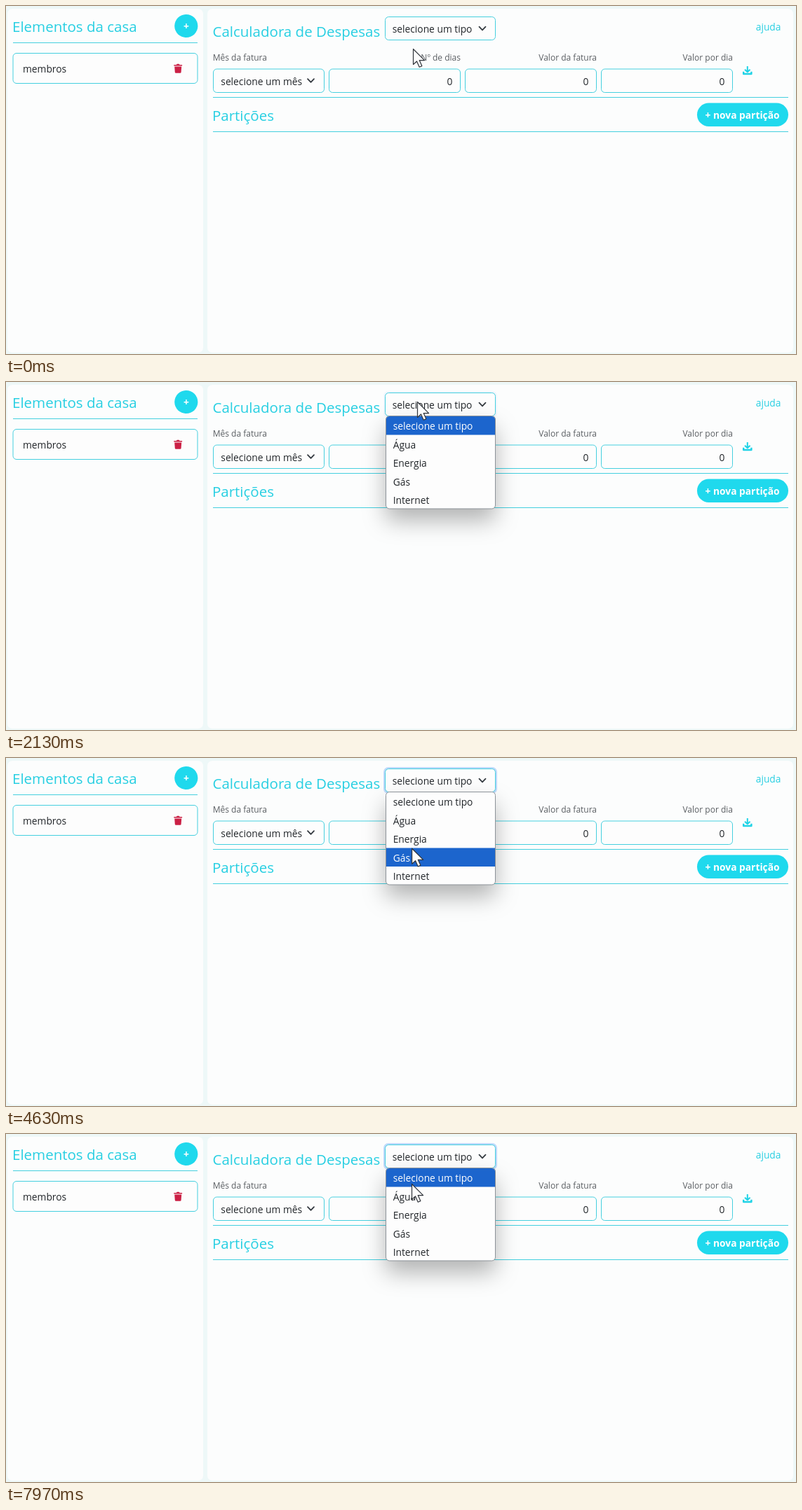
These frames come from a looping animation (1126 by 497 pixels, 8000 ms). An HTML page:

```html
<!DOCTYPE html>
<html lang="pt">
<head>
<meta charset="utf-8">
<title>Calculadora de Despesas</title>
<style>
html, body { margin: 0; width: 100%; height: 100%; overflow: hidden; background: #eef8f8; }
svg { display: block; width: 1126px; height: 497px; }
text { font: 13.8px "Open Sans", "Noto Sans", sans-serif; fill: #212529; }
.title { font-size: 20.5px; fill: #27cfe2; }
.label { font-size: 12px; fill: #5a5e62; }
.link { fill: #27cfe2; }
.end { text-anchor: end; }
.bold { font-weight: 700; fill: #fff; }
.panel { fill: #fcfdfd; }
.cyan { fill: #1fd9ed; }
.box { fill: #fdfdfd; stroke: #45cfdf; }
.rule { stroke: #45cfdf; fill: none; }
.chevron { fill: none; stroke: #343a40; stroke-width: 1.8; stroke-linecap: round; stroke-linejoin: round; }
.shadow { filter: drop-shadow(0 17px 16px rgba(0, 0, 0, .29)); }
</style>
</head>
<body>
<svg viewBox="0 0 1126 497">
  <defs>
    <clipPath id="menuClip"><rect x="541.5" y="49" width="156" height="132" rx="5"/></clipPath>
    <path id="chevron" class="chevron" d="M-4.5-2.3 0 2.3 4.5-2.3"/>
  </defs>

  <rect class="panel" x="2" y="4" width="279" height="491" rx="7"/>
  <rect class="panel" x="287" y="4" width="835" height="491" rx="7"/>

  <text class="title" x="9" y="36.5">Elementos da casa</text>
  <circle class="cyan" cx="256.8" cy="28.5" r="16.6"/>
  <text class="bold" x="257" y="34" text-anchor="middle">+</text>
  <path class="rule" d="M10 52.5H273"/>
  <rect class="box" x="10" y="67.5" width="263" height="43" rx="5"/>
  <text x="24" y="95">membros</text>
  <path fill="#cb2045" d="M239.3 84h3.5l.8-1.2h3.2l.8 1.2h3.5v1.6h-11.8zM240.2 86.4h10l-.6 8.2q-.1 1.2-1.3 1.2h-6.2q-1.2 0-1.3-1.2z"/>

  <text class="title" x="294.5" y="43.5">Calculadora de Despesas</text>
  <text class="link end" x="1104.5" y="34.5">ajuda</text>
  <rect id="ring" x="538" y="13" width="162" height="38" rx="7" fill="#bfdafb"/>
  <rect class="box" x="540.5" y="15.5" width="157" height="33" rx="5"/>
  <text x="550.7" y="38">selecione um tipo</text>
  <use href="#chevron" x="679" y="32"/>

  <text class="label" x="294.7" y="77.5">Mês da fatura</text>
  <text class="label end" x="648" y="77.5">Nº de dias</text>
  <text class="label end" x="842" y="77.5">Valor da fatura</text>
  <text class="label end" x="1036" y="77.5">Valor por dia</text>
  <rect class="box" x="295.5" y="90" width="158" height="33.5" rx="5"/>
  <text x="306.3" y="112.5">selecione um mês</text>
  <use href="#chevron" x="434.5" y="106.5"/>
  <g id="fields"></g>
  <g fill="none" stroke="#1fd3e6" stroke-width="2" stroke-linejoin="round">
    <path d="M1056.8 86V94M1053 90.7 1056.8 94.3 1060.6 90.7"/>
    <path d="M1051.2 93.8V97H1062.4V93.8" stroke-width="2.4"/>
  </g>
  <path class="rule" d="M295 130.5H1115M295 179.5H1115"/>

  <text class="title" x="294" y="163.5">Partições</text>
  <rect class="cyan" x="985" y="138.5" width="130" height="33.5" rx="16.7"/>
  <text class="bold" x="996.5" y="161">+ nova partição</text>

  <g id="menu">
    <rect class="shadow" x="541.5" y="48.5" width="156" height="132.5" rx="5" fill="#fdfdfd"/>
    <rect id="mark" x="541" width="157" height="26.5" fill="#1c65cd" clip-path="url(#menuClip)"/>
    <g id="options"></g>
    <rect x="541.5" y="48.5" width="156" height="132.5" rx="5" fill="none" stroke="#8d9399"/>
  </g>

  <path id="cursor" d="M.5.5V22.5L5.5 18 9.2 26.2 12.8 24.6 9.2 16.6H16.6Z" fill="#fdfdfd" stroke="#30343a" stroke-width="1.2" stroke-linejoin="round"/>
</svg>
<script>
const LOOP = 8000, OPEN = 2100, TOP = 49, ROW = 26.5;
const $ = id => document.getElementById(id);

$('fields').innerHTML = [460.5, 654.5, 848.5].map(x =>
  `<rect class="box" x="${x}" y="90" width="187" height="33.5" rx="5"/>
   <text class="end" x="${x + 176}" y="112.5">0</text>`).join('');

$('options').innerHTML = ['selecione um tipo', 'Água', 'Energia', 'Gás', 'Internet'].map((name, i) =>
  `<text x="551.7" y="${68 + i * ROW}">${name}</text>`).join('');
const options = [...$('options').children];

// Pointer turning points: time, x, y
const path = [
  [0, 580, 61], [200, 580, 61], [900, 586, 28], [2300, 586, 28], [2830, 585, 70],
  [3320, 575, 162], [3800, 582, 78], [4330, 574, 164], [5010, 584, 78],
  [5720, 571, 161], [6235, 581.5, 77], [6655, 567, 166], [7080, 582, 77],
  [7510, 568, 161], [7970, 578, 71], [LOOP, 578, 71]
];

function pointerAt(t) {
  const i = path.findIndex(key => key[0] > t);
  const [t0, x0, y0] = path[i - 1], [t1, x1, y1] = path[i];
  const k = (1 - Math.cos(Math.PI * (t - t0) / (t1 - t0))) / 2;
  return [x0 + (x1 - x0) * k, y0 + (y1 - y0) * k];
}

function draw(now) {
  const t = now % LOOP;
  const [x, y] = pointerAt(t);
  const row = Math.max(0, Math.min(4, Math.floor((y - TOP) / ROW)));
  $('cursor').setAttribute('transform', `translate(${x} ${y})`);
  $('menu').style.display = t < OPEN ? 'none' : '';
  $('ring').style.opacity = Math.max(0, Math.min(1, (t - OPEN) / 150));
  $('mark').setAttribute('y', TOP + row * ROW);
  options.forEach((option, i) => option.style.fill = i === row ? '#fff' : '');
}

function tick() {
  draw(performance.now());
  requestAnimationFrame(tick);
}
tick();
</script>
</body>
</html>
```
